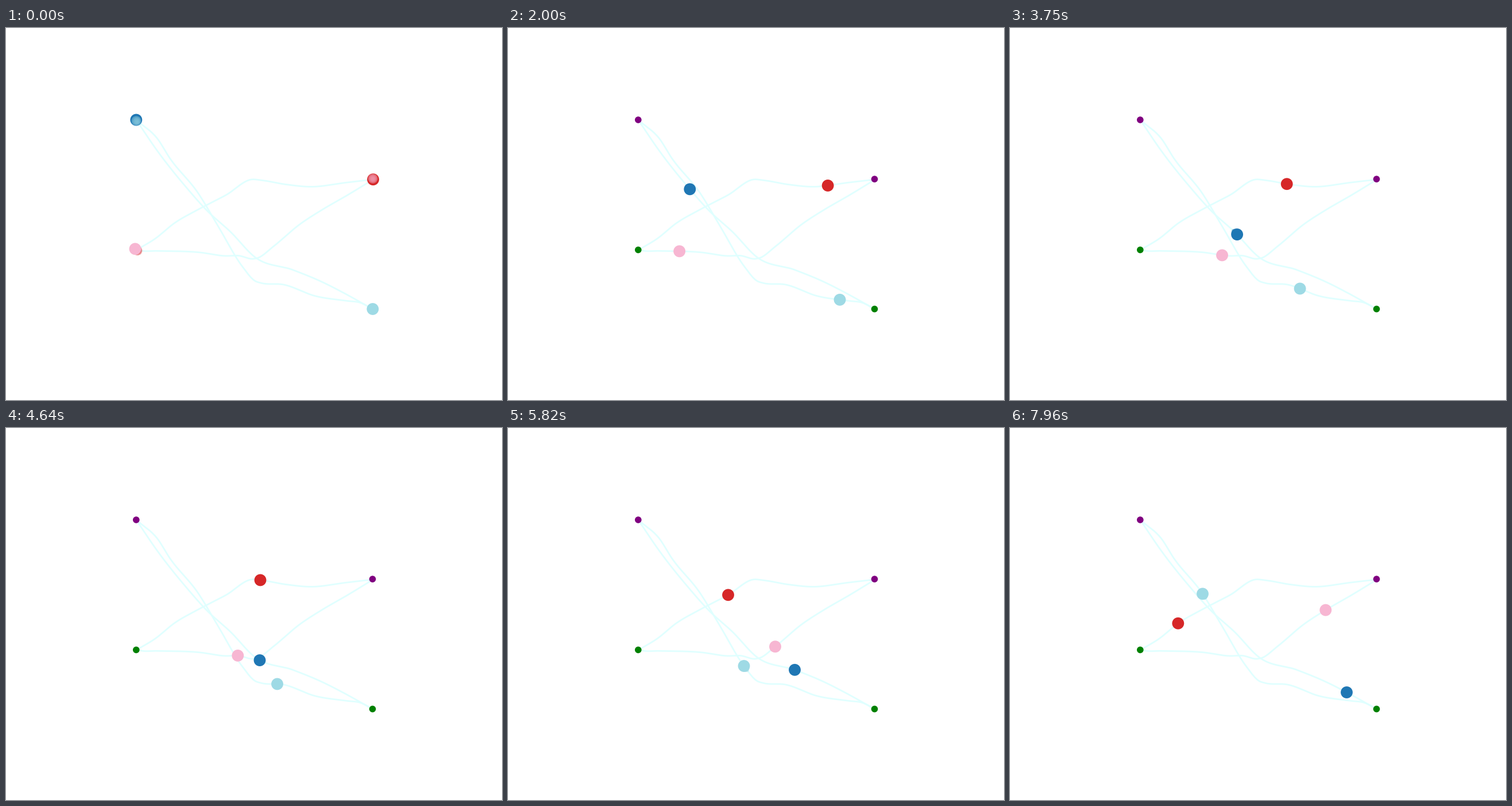
Recreate the animation shown at these times as a matplotlib script. Size 864 by 648 pixels, loop 8000 ms.

```python
import numpy as np
import matplotlib.pyplot as plt
from matplotlib.animation import FuncAnimation
from matplotlib.patches import Circle

W, H, DPI = 864, 648, 100
LOOP, TICK = 8000, 20
STEPS = 224            # simulation steps in one loop
RADIUS, TRAIL = 10.4, 4
KEY_STEPS = (34, 79, 130, 163, 196, 223)


def smooth(x, xs, ys):
    """Cubic Hermite curve through a few points, xs increasing."""
    xs, ys = np.asarray(xs, float), np.asarray(ys, float)
    slope = np.gradient(ys, xs)
    x = np.clip(x, xs[0], xs[-1])
    i = np.clip(np.searchsorted(xs, x) - 1, 0, len(xs) - 2)
    h = xs[i + 1] - xs[i]
    t = (x - xs[i]) / h
    bend = (1 - t) * slope[i] * h - t * slope[i + 1] * h
    ease = t * t * (3 - 2 * t)
    return (ys[i] + ease * (ys[i + 1] - ys[i])
            + t * (1 - t) * bend)


class Walker:
    """A ball following y(x); x runs through key places after a wait."""

    def __init__(self, color, path, start, places, last, drift):
        self.color = color
        self.px, self.py = np.array(sorted(path), float).T
        self.steps = (start, *KEY_STEPS)
        self.places = places
        self.last, self.drift = np.array(last), np.array(drift)

    def pos(self, k):
        if k < 0:      # tail left over from the previous trip
            return self.last + (-k - 1) * self.drift
        x = smooth(k, self.steps, self.places)
        return x, smooth(x, self.px, self.py)

    def add_to(self, ax, z):
        x = np.linspace(self.px[0], self.px[-1], 200)
        ax.plot(x, smooth(x, self.px, self.py), color="lightcyan", lw=2,
                zorder=1)
        self.discs = []
        for i in range(TRAIL, -1, -1):
            fade = 1 - i / (TRAIL + 1)
            disc = Circle((0, 0), RADIUS * fade, color=self.color, lw=0,
                          alpha=0.55 * fade if i else 1, zorder=z)
            self.discs.append((i, ax.add_patch(disc)))

    def move(self, k):
        for i, disc in self.discs:
            disc.center = tuple(self.pos(k - i))


blue = Walker(
    "#1f77b4",
    [(226.3, 159.5), (262, 212), (316, 280), (349, 317), (391, 355),
     (433, 398.5), (499, 420.8), (550, 441.8), (586, 460), (638, 489)],
    0, (226.3, 285, 349, 441.5, 499, 550, 586),
    last=(638, 489), drift=(0, 0))

red = Walker(
    "#d62728",
    [(639, 263.3), (590, 269), (531, 276), (487, 272), (443, 264.5),
     (428, 263.3), (383, 290.3), (334, 315.8), (292, 340), (260, 366),
     (227, 386)],
    0, (639, 590.5, 520.5, 442.5, 383, 334, 292.3),
    last=(228.5, 387.3), drift=(0.4, 0.2))

pink = Walker(
    "#f7b6d2",
    [(224.5, 384.3), (234, 387.2), (261, 387.8), (336, 390.3), (382, 396.5),
     (404, 396), (431, 401.5), (438, 400), (465, 380.3), (510.5, 342),
     (549, 316.8), (592, 292), (638, 264)],
    12, (224.5, 260.8, 335.5, 403.3, 465, 510.5, 549.3),
    last=(638.5, 261.8), drift=(0, 0.1))

cyan = Walker(
    "#9edae5",
    [(638.3, 489), (618, 478.5), (590, 474.5), (538, 466.3), (483, 446.5),
     (443, 443.5), (434, 440.5), (410.5, 414), (370, 346.5), (335, 288.3),
     (282, 222), (266, 196), (227, 160)],
    30, (638.3, 627, 538.5, 472, 410.5, 370, 335),
    last=(226.5, 161.3), drift=(0.5, 0.6))

walkers = [blue, red, pink, cyan]

fig = plt.figure(figsize=(W / DPI, H / DPI), dpi=DPI, facecolor="white")
ax = fig.add_axes([0, 0, 1, 1])
ax.set_xlim(-0.5, W - 0.5)
ax.set_ylim(H - 0.5, -0.5)
ax.axis("off")

for color, spots in (("purple", [(226.3, 159.5), (638, 262.7)]),
                     ("green", [(226.3, 386), (638, 489)])):
    for spot in spots:
        ax.add_patch(Circle(spot, 5.8, color=color, lw=0, zorder=2))

for n, walker in enumerate(walkers):
    walker.add_to(ax, 3 + n)


def update(frame):
    k = min(int((frame * TICK + 15) * STEPS / LOOP), STEPS - 1)
    for walker in walkers:
        walker.move(k)
    return []


anim = FuncAnimation(fig, update, frames=LOOP // TICK, interval=TICK,
                     init_func=lambda: update(0), repeat=True,
                     repeat_delay=0, blit=False)
plt.show()
```
